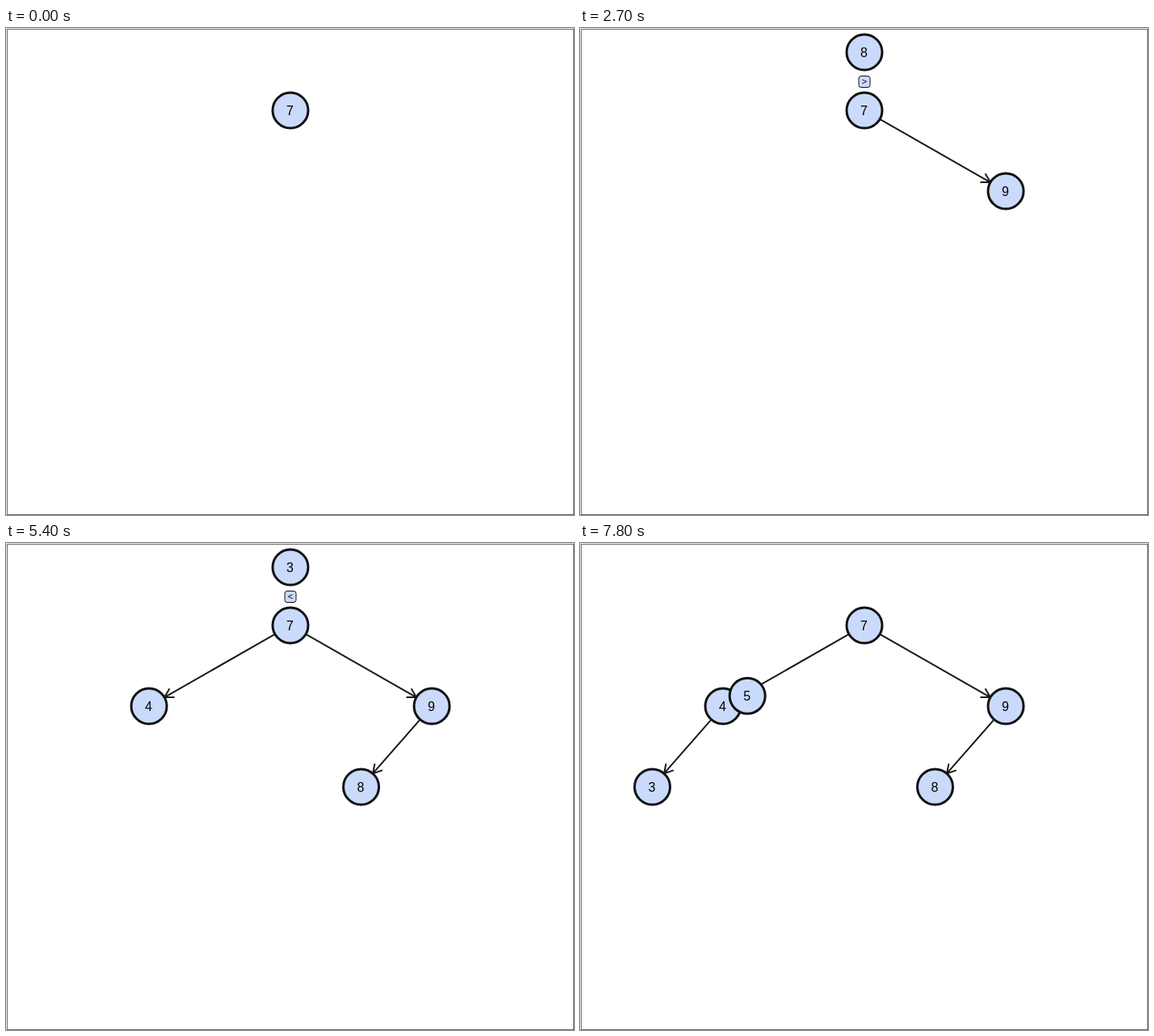
Recreate the animation shown at these times as an HTML page. Size 703x603 px, loop 8000 ms.

```html
<!DOCTYPE html>
<html>
<head>
<meta charset="utf-8">
<title>Binary search tree</title>
<style>
html, body { margin: 0; width: 100%; height: 100%; overflow: hidden; background: #fff; }
svg { display: block; }
text { font-family: "Liberation Sans", Arial, sans-serif; font-size: 16px; text-anchor: middle; fill: #000; }
circle, .badge { fill: #c9dafb; stroke: #111; stroke-width: 3; }
.badge { stroke-width: 1; }
.sign { font-size: 11px; }
path { fill: none; stroke: #1a1a1a; stroke-width: 2; }
.frame { fill: none; stroke: #666; }
</style>
</head>
<body>
<svg id="stage" width="703" height="603"></svg>
<script>
const LOOP = 8000, STEP = 300, R = 22, GAP = 72;
const stage = document.getElementById('stage');
const spot = {
  7: [352, 102], 4: [177, 202], 9: [527, 202],
  3: [89.5, 302], 5: [264.5, 302], 8: [439.5, 302]
};
const above = key => [spot[key][0], spot[key][1] - GAP];
const mix = (a, b, f) => a.map((v, i) => v + (b[i] - v) * f);
const top7 = above(7);

// Each key: the step it begins, the position, and the comparison sign below, if any.
const tracks = [
  { key: 7, keys: [[0, spot[7]]] },
  { key: 9, parent: 7, linked: 6, keys: [
    [3, top7], [4, top7, '&gt;'], [5, mix(top7, spot[9], 0.8)], [6, spot[9]]] },
  { key: 8, parent: 9, linked: 13, keys: [
    [9, top7, '&gt;'], [10, mix(top7, above(9), 0.846)],
    [11, above(9), '&lt;'], [12, spot[8]]] },
  { key: 4, parent: 7, linked: 17, keys: [
    [14, top7], [15, top7, '&lt;'], [16, mix(top7, spot[4], 0.987)], [17, spot[4]]] },
  { key: 3, parent: 4, linked: 22, keys: [
    [18, top7, '&lt;'], [19, mix(top7, above(4), 0.514)],
    [20, above(4), '&lt;'], [21, spot[3]]] },
  { key: 5, parent: 4, linked: 99, keys: [
    [23, top7], [24, top7, '&lt;'], [25, mix(top7, above(4), 0.92)],
    [26, mix(above(4), spot[5], 0.345)]] }
];

function arrow([x1, y1], [x2, y2]) {
  const a = Math.atan2(y2 - y1, x2 - x1);
  const polar = (x, y, r, t) => `${x + r * Math.cos(t)},${y + r * Math.sin(t)}`;
  const tx = x2 - R * Math.cos(a), ty = y2 - R * Math.sin(a);
  const barb = turn => polar(tx, ty, 12.5, a + Math.PI + turn);
  return `<path d="M${polar(x1, y1, R, a)} L${tx},${ty} M${barb(0.52)} L${tx},${ty} L${barb(-0.52)}"/>`;
}

function node(label, [x, y], sign) {
  let s = `<circle cx="${x}" cy="${y}" r="${R}"/><text x="${x - 0.5}" y="${y + 6}">${label}</text>`;
  if (sign) {
    s += `<rect class="badge" x="${x - 7}" y="${y + 29.5}" width="14" height="14" rx="3"/>
      <text class="sign" x="${x}" y="${y + 40}">${sign}</text>`;
  }
  return s;
}

function draw(step) {
  let links = '', nodes = '';
  for (const { key, parent, linked, keys } of tracks) {
    const now = keys.filter(k => k[0] <= step).pop();
    if (!now) continue;
    if (step >= linked) links += arrow(spot[parent], spot[key]);
    nodes += node(key, now[1], now[2]);
  }
  stage.innerHTML = '<rect class="frame" x="1.5" y="1.5" width="701" height="601"/>' + links + nodes;
}

let last = -1;
function tick() {
  const step = Math.floor(performance.now() % LOOP / STEP);
  if (step !== last) draw(last = step);
  requestAnimationFrame(tick);
}
tick();
</script>
</body>
</html>
```
